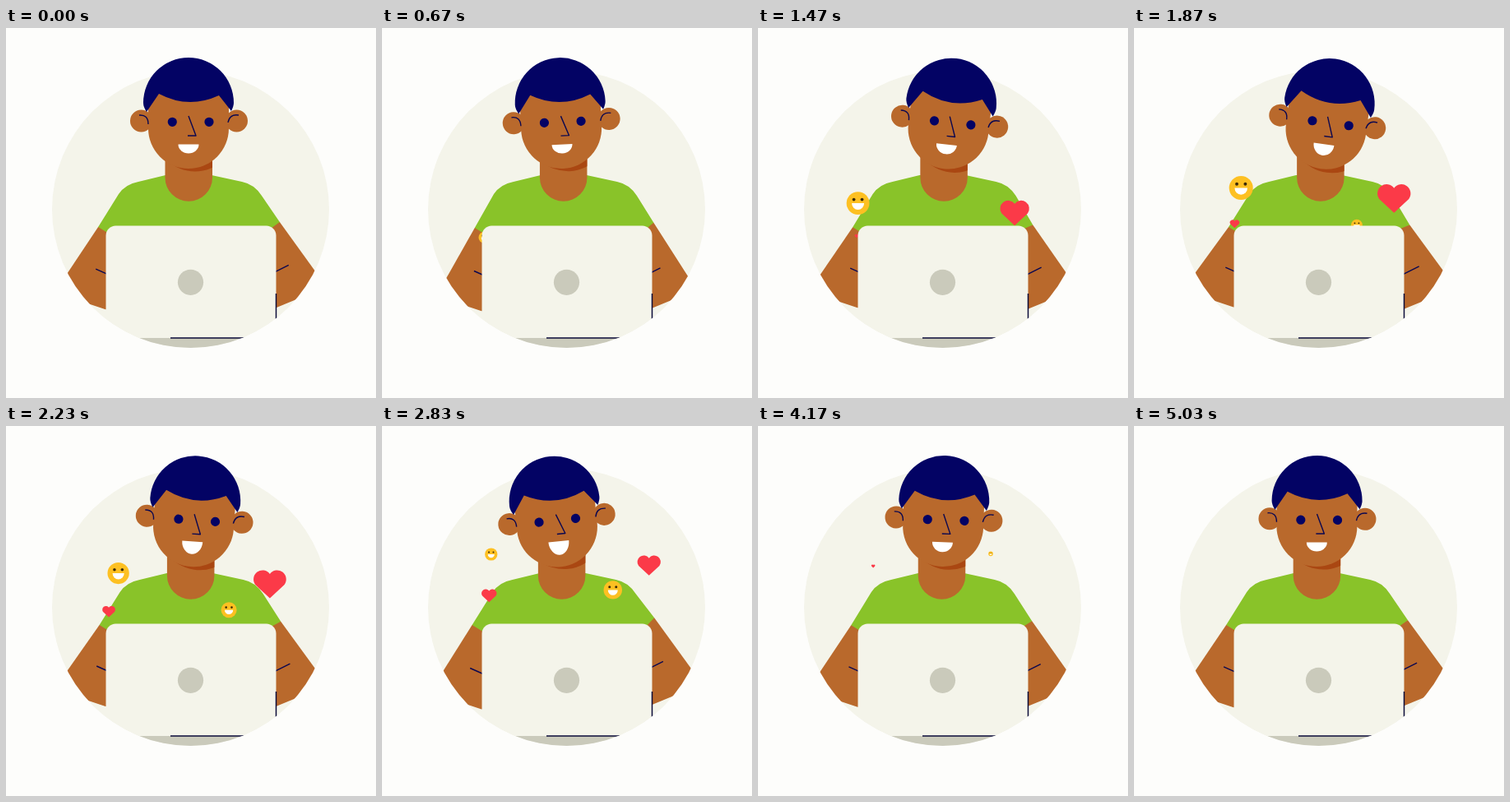
An HTML page that plays this animation: 450 by 450 pixels, repeating every 5.06 s.

```html
<!DOCTYPE html>
<html lang="en">
<head>
<meta charset="utf-8">
<title>Chatting at the laptop</title>
<style>
  html, body { margin: 0; width: 100%; height: 100%; overflow: hidden; background: #fdfdfb; }
  svg { display: block; width: 100%; height: 100%; }
  .pale { fill: #f4f4ea; }
  .grey { fill: #cacabb; }
  .skin { fill: #b9692c; }
  .shade { fill: #aa4712; }
  .shirt { fill: #89c329; }
  .navy { fill: #030364; }
  .white { fill: #fff; }
  .line { fill: none; stroke: #0b0750; stroke-width: 1.4; stroke-linejoin: round; }
  .edge { fill: none; stroke: #0b0b3a; stroke-width: 1.5; }
  .red { fill: #fb3a48; }
  .yellow { fill: #fdc022; }
  .dark { fill: #3c2a08; }
</style>
</head>
<body>
<svg viewBox="0 0 450 450">
  <defs>
    <clipPath id="disc"><circle cx="224.5" cy="220.5" r="168.5"/></clipPath>
    <path id="neckShape" d="M193.5 130V182A28.7 28.7 0 0 0 251 182V130Z"/>
    <clipPath id="neckClip"><use class="neck" href="#neckShape"/></clipPath>
    <path id="heart" class="red" d="M0 16L-15 2A9.3 9.3 0 0 1 0 -9A9.3 9.3 0 0 1 15 2Z"/>
    <g id="smiley">
      <circle class="yellow" r="14"/>
      <circle class="dark" cx="-5" cy="-4.5" r="1.9"/>
      <circle class="dark" cx="5" cy="-4.5" r="1.9"/>
      <path class="white" d="M-7.5 0H7.5A7.5 8 0 0 1 -7.5 0Z"/>
    </g>
  </defs>

  <circle class="pale" cx="224.5" cy="220.5" r="168.5"/>

  <g clip-path="url(#disc)">
    <rect class="grey" x="100" y="377" width="250" height="20"/>
    <path id="armL" class="skin"/>
    <path id="armR" class="skin"/>
    <path id="creases" class="line"/>
    <path id="shirt" class="shirt"/>
  </g>

  <use class="neck skin" href="#neckShape"/>
  <g clip-path="url(#neckClip)"><circle class="head shade" cx="230" cy="125.5" r="49"/></g>

  <g class="head">
    <circle class="skin" cx="164.5" cy="113" r="13.5"/>
    <circle class="skin" cx="280.5" cy="113" r="13.5"/>
    <path class="skin" d="M173 70V122A49 49 0 0 0 271 122V70Z"/>
    <path class="navy" d="M171 102L186 80Q222 99 259 82L274 101Q277 95 277 91A55 55 0 0 0 167 91Q167 96 171 102Z"/>
    <path class="line" d="M162 106Q173 105 173 117M283 106Q272 104 270 115M222 107L231 131H221"/>
    <g id="eyes">
      <circle class="navy" cx="202.3" cy="114.3" r="5.6"/>
      <circle class="navy" cx="247" cy="114.3" r="5.6"/>
    </g>
    <path id="mouth" class="white"/>
  </g>

  <g id="floats"></g>

  <g clip-path="url(#disc)">
    <rect class="pale" x="121.5" y="240.5" width="207" height="136.5" rx="12"/>
    <circle class="grey" cx="224.5" cy="309.3" r="15.6"/>
    <path class="edge" d="M200 377H300M328.5 323V360"/>
  </g>
</svg>

<script>
const LOOP = 5060, LIFE = 3250;
const { sin, cos, abs, PI } = Math;
const $ = id => document.getElementById(id);

// Rises from 0 to 1 and back, centred on mid.
const bump = (t, mid, half) => abs(t - mid) < half ? cos((t - mid) / half * PI / 2) : 0;

// Head lean in degrees: two swings per loop of unequal size.
function lean(t) {
  const w = 2 * PI * t / LOOP;
  return 3.4 * sin(w) - 5.6 * sin(2 * w) + .6 * (cos(w) - cos(2 * w));
}
const dip = t => bump(t, 850, 1000) ** 2 + .3 * bump(t, 4400, 600) ** 2;
const smile = t => 11 + 5.5 * bump(t, 2850, 1500);

// Reactions rise from behind the screen, swaying while they grow and shrink.
const floats = [
  { shape: 'smiley', born: 150, x: 144, y: 285, drift: -32, sway: 17, rise: 197, size: 1.04 },
  { shape: 'heart', born: 380, x: 318.5, y: 279, drift: -1, sway: 7, rise: 181, size: 1.21 },
  { shape: 'heart', born: 1180, x: 118.5, y: 264.5, drift: 23, sway: 1, rise: 133, size: .55 },
  { shape: 'smiley', born: 1180, x: 283.5, y: 273, drift: -6.5, sway: 11.5, rise: 166, size: .8 }
];
for (const f of floats) {
  f.node = document.createElementNS('http://www.w3.org/2000/svg', 'use');
  f.node.setAttribute('href', '#' + f.shape);
  $('floats').append(f.node);
}

function drawFloat(f, t) {
  const u = (t - f.born) / LIFE;
  const x = f.x + f.drift * u - f.sway * sin(2 * PI * u);
  const y = f.y - f.rise * (u - u * u / 4);
  const scale = u > 0 && u < 1 ? f.size * sin(PI * u) : 0;
  f.node.setAttribute('transform', `translate(${x} ${y}) scale(${scale})`);
}

const setPath = (id, d) => $(id).setAttribute('d', d);
const setAll = (selector, transform) =>
  document.querySelectorAll(selector).forEach(el => el.setAttribute('transform', transform));
const poly = points => 'M' + points.map(p => p.join(' ')).join('L') + 'Z';
const beyond = (from, to) => to.map((v, i) => v + (v - from[i]) * .3);

function drawHead(a, open) {
  setAll('.head', `rotate(${a} 222 208)`);
  setAll('.neck', `translate(${a * .6} 0)`);
  setAll('#eyes', `translate(${a * .25} 0)`);
  const top = 141.5 - (open - 11) * .3;
  setPath('mouth', `M209.5 ${top}H234.5A12.5 ${open} 0 0 1 209.5 ${top}Z`);
}

// Arms run past the disc, which trims the elbows.
function drawBody(a, b) {
  const hemL = [112 + .4 * a + 2 * b, 242 + b];
  const hemR = [333 + .3 * a - 2 * b, 236 + .45 * a + 2 * b];
  const baseL = 342.3 - .35 * a + b;
  const baseR = 340 + .2 * a + b;
  setPath('armL', poly([hemL, beyond(hemL, [75 + 4 * b, 297 + 7 * b]),
    [70, baseL - 17], [121, baseL], [140, baseL], [140, 235]]));
  setPath('armR', poly([hemR, beyond(hemR, [376 - 4 * b, 295 + 8 * b]),
    [380, baseR - 21], [329, baseR], [310, baseR], [310, 230]]));
  setPath('creases', `M${109 + .3 * a + 4 * b} ${293 - .25 * a + 2 * b}l18 8`
    + `M${344 + .35 * a - 5 * b} ${288 + .25 * a + 5 * b}l-20 10`);

  const s = .4 * a;
  setPath('shirt', `M${194 + s} 179L${161 + s} 187Q${145 + s} 190 ${137 + s} 202`
    + `L${hemL.join(' ')}L${125 + s} 250V262H319V246L${hemR.join(' ')}`
    + `L${311 + s} 204Q${302 + s} 190 ${287 + s} 187L${250 + s} 179Z`);
}

const start = performance.now();
function tick() {
  const t = (performance.now() - start) % LOOP;
  drawHead(lean(t), smile(t));
  drawBody(lean(t), dip(t));
  floats.forEach(f => drawFloat(f, t));
  requestAnimationFrame(tick);
}
tick();
</script>
</body>
</html>
```
